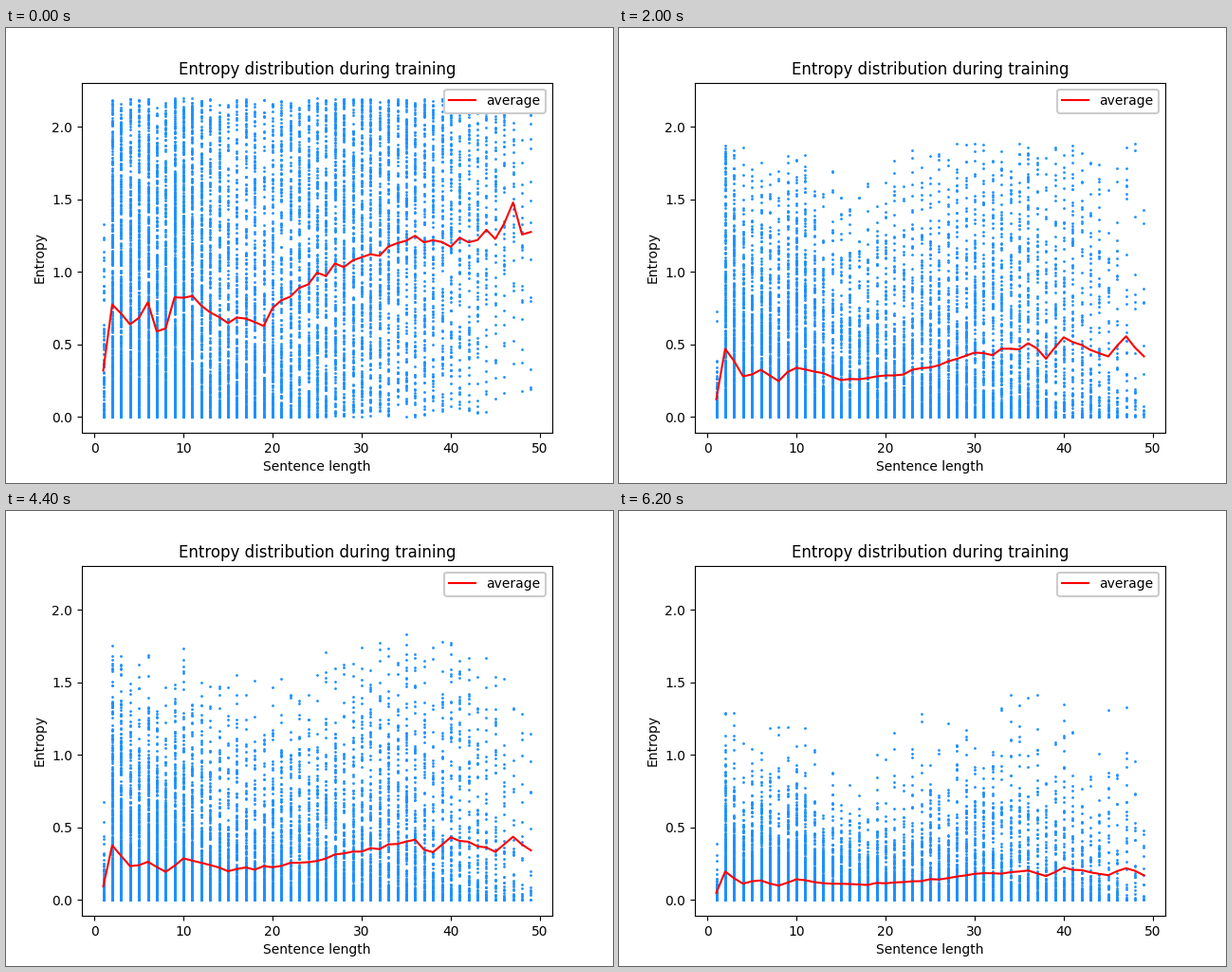
A matplotlib script for the animation above (6400 ms loop, 640x480 px).

```python
import matplotlib.pyplot as plt
import numpy as np
from matplotlib.animation import FuncAnimation

FRAMES, INTERVAL = 32, 200
MAX_ENTROPY = 2.195
MARGIN = .05 * MAX_ENTROPY
lengths = np.arange(1, 50)


def through(points, x):
    """Piecewise linear curve through (x, y) key points."""
    return np.interp(x, *zip(*points))


early = through([(1, .33), (2, .77), (4, .63), (6, .77), (7, .58), (8, .60),
                 (9, .81), (12, .78), (14, .66), (17, .69), (19, .62),
                 (20, .79), (24, .93), (30, 1.10), (36, 1.23), (45, 1.22),
                 (47, 1.44), (48, 1.22)], lengths)
late = through([(1, .33), (2, 1.27), (4, .76), (6, .88), (8, .65),
                (10, .95), (15, .70), (19, .75), (24, .88), (30, 1.15),
                (36, 1.35), (38, 1.10), (40, 1.45), (45, 1.13), (47, 1.50),
                (49, 1.15)], lengths)
levels = [(0, 1), (6, .51), (10, .37), (14, .235), (22, .30), (27, .125),
          (31, .15)]
counts = through([(1, 110), (2, 480), (9, 540), (13, 270), (22, 210),
                  (30, 200), (49, 14)], lengths).astype(int)
point_x = np.repeat(lengths, counts)


def average_line(frame, level, rng):
    start = np.exp(-frame / 2)
    line = level * (start * early + (1 - start) * late)
    return line * rng.normal(1, .025, line.size)


def sample_points(level, line, rng):
    """Skewed samples per length whose mean follows the average line."""
    cap = MAX_ENTROPY * level ** .15
    mean = line / cap
    b = np.maximum(1, .4 * (1 - mean) / mean)
    a = b * mean / (1 - mean)
    return cap * rng.beta(np.repeat(a, counts), np.repeat(b, counts))


fig, ax = plt.subplots(figsize=(6.4, 4.8), dpi=100)
dots, = ax.plot([], [], ".", color="dodgerblue", markersize=2)
curve, = ax.plot([], [], color="red", label="average")
ax.set(xlim=(-1.4, 51.4), ylim=(-MARGIN, MAX_ENTROPY + MARGIN),
       title="Entropy distribution during training",
       xlabel="Sentence length", ylabel="Entropy")
legend = ax.legend(loc="upper right", framealpha=1)
legend.get_frame().set_linewidth(1.5)


def update(frame):
    rng = np.random.default_rng(100 + frame)
    level = through(levels, frame)
    line = average_line(frame, level, rng)
    curve.set_data(lengths, line)
    dots.set_data(point_x, sample_points(level, line, rng))
    return dots, curve


animation = FuncAnimation(fig, update, frames=FRAMES, interval=INTERVAL,
                          repeat=True, repeat_delay=0)
plt.show()
```
